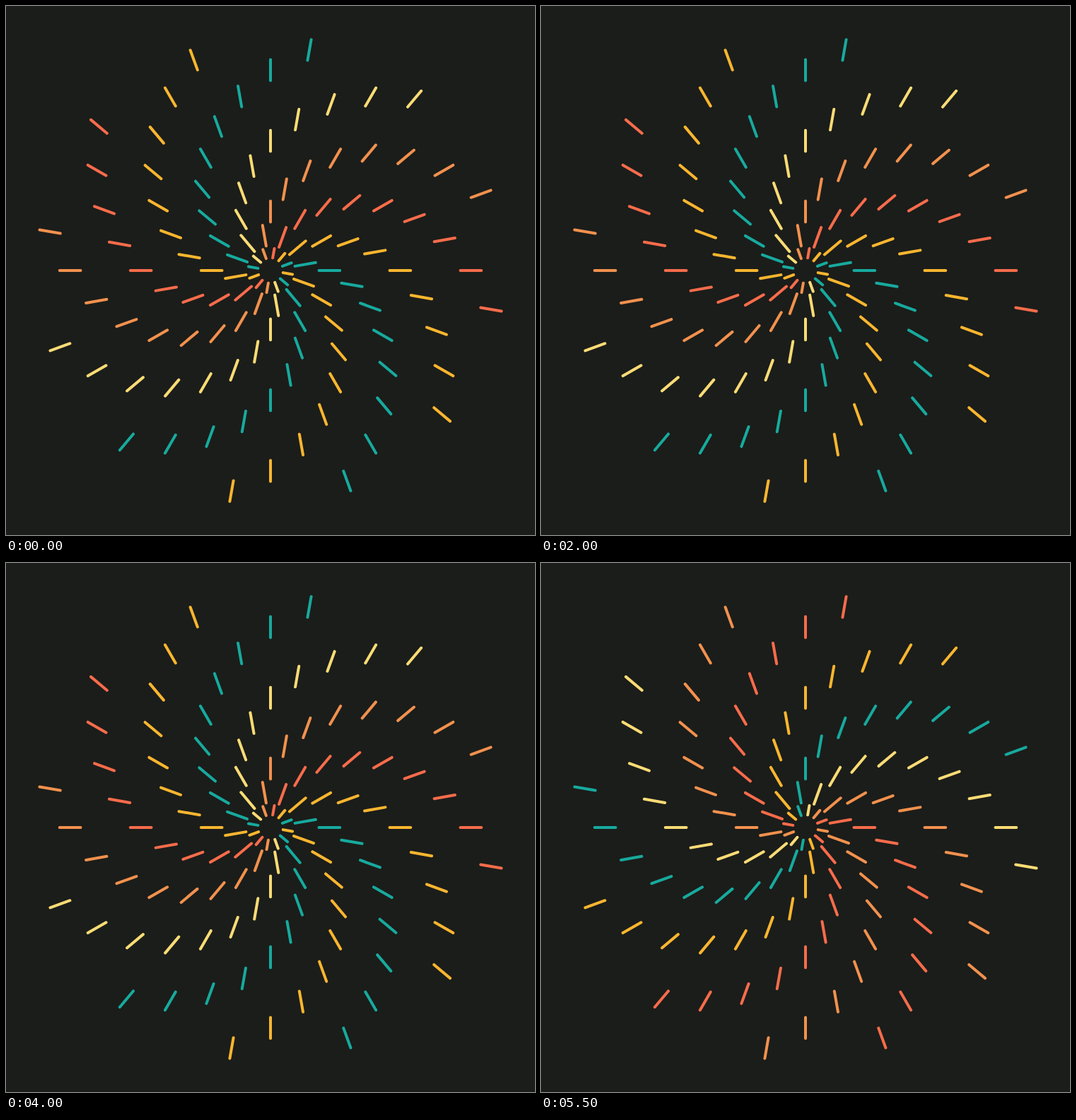
Animation, 748 px wide and 748 px high, one loop 5750 ms. Source, as an HTML page:

```html
<!DOCTYPE html>
<html lang="en">
<head>
<meta charset="utf-8">
<title>Spiral burst</title>
<style>
  html, body { margin: 0; width: 100%; height: 100%; overflow: hidden; background: #1b1d1a; }
  svg { display: block; width: 100vw; height: 100vh; }
  path { fill: none; stroke-width: 4; stroke-linecap: round; }
</style>
</head>
<body>
<svg viewBox="-374 -374 748 748"></svg>
<script>
const PALETTE = ['#fbb62f', '#17aa9e', '#fbdc75', '#f2914e', '#f86c4b'];
const SHIFTS = '01234023012301230124023'; // palette offset per step
const STEP = 250;
const ARMS = 12, DASHES = 10, UNIT = 100 / 3, CAP = 1.8, HOLE = 18;

const svg = document.querySelector('svg');

function point(r, deg) {
  const a = deg * Math.PI / 180;
  return `${(r * Math.sin(a)).toFixed(2)} ${(-r * Math.cos(a)).toFixed(2)}`;
}

// Each arm winds outward: one dash further out for every 10 degrees.
function armPath(arm) {
  let d = '';
  for (let j = 0; j < DASHES; j++) {
    const deg = 100 + arm * 30 + j * 10;
    const from = Math.max(HOLE, j * UNIT + CAP);
    const to = (j + 1) * UNIT - CAP;
    d += `M${point(from, deg)}L${point(to, deg)}`;
  }
  return d;
}

const arms = Array.from({ length: ARMS }, (_, i) => {
  const path = document.createElementNS('http://www.w3.org/2000/svg', 'path');
  path.setAttribute('d', armPath(i));
  return svg.appendChild(path);
});

let shown = -1;
function paint(step) {
  if (step === shown) return;
  shown = step;
  const shift = +SHIFTS[step];
  arms.forEach((arm, i) => arm.setAttribute('stroke', PALETTE[(i + shift) % PALETTE.length]));
}

const start = performance.now();
function tick() {
  const t = performance.now() - start;
  paint(Math.floor(t / STEP) % SHIFTS.length);
  requestAnimationFrame(tick);
}
tick();
</script>
</body>
</html>
```
